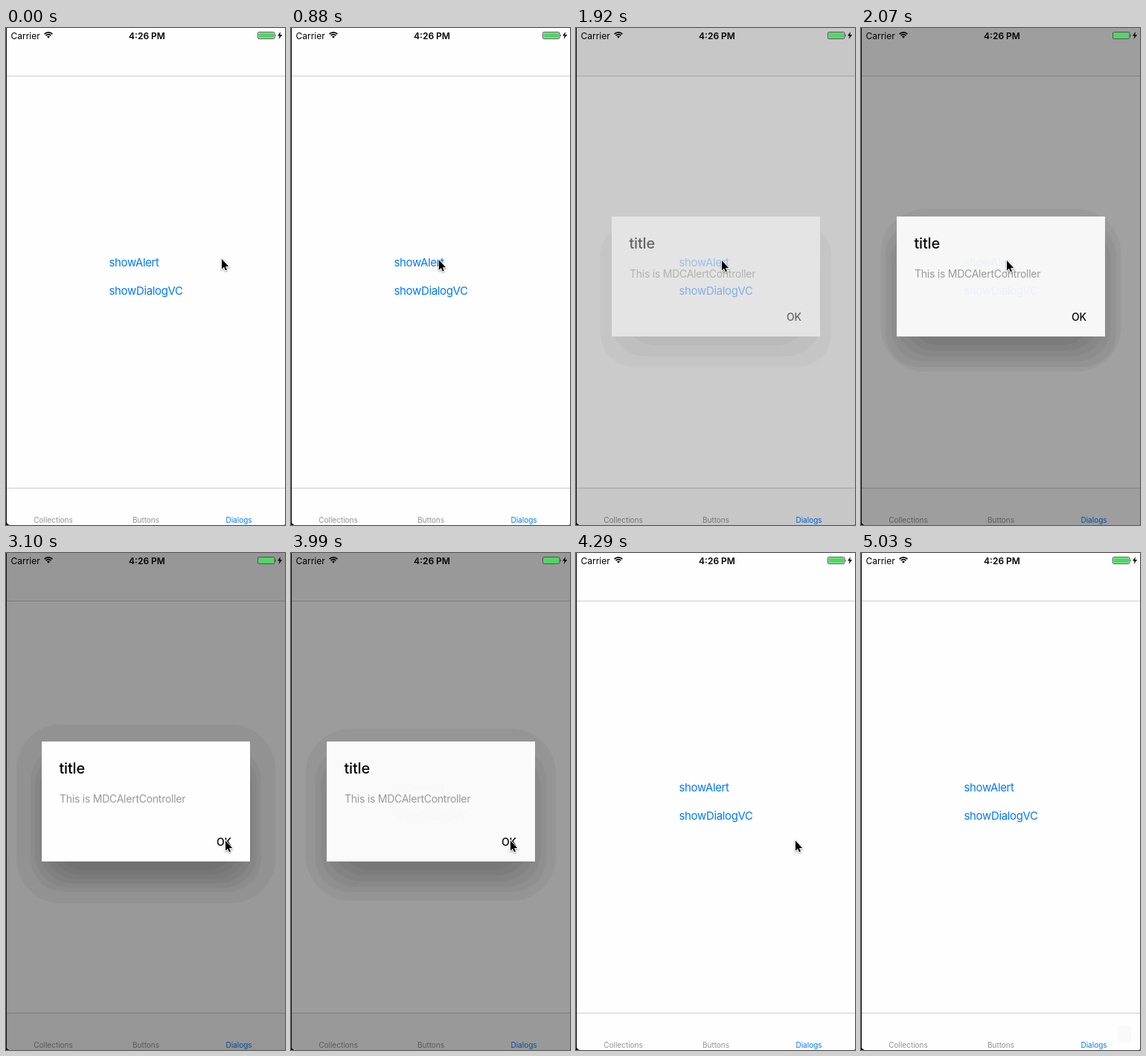
An HTML page that plays this animation: 375x667 px, repeating every 5490 ms.

```html
<!DOCTYPE html>
<html lang="en">
<head>
<meta charset="utf-8">
<title>Alert dialog demo</title>
<style>
  html, body { margin: 0; width: 100%; height: 100%; overflow: hidden; background: #111; }
  svg { display: block; }
  text { font: 15px Inter, "Open Sans", sans-serif; }
  .link { fill: #007aff; letter-spacing: -.023em; }
  .tab { font-size: 10px; text-anchor: middle; fill: #929292; }
  .tab.on { fill: #007aff; }
  .status { font-size: 12px; }
  .time { font-weight: 600; text-anchor: middle; }
  .title { font-size: 20px; font-weight: 500; letter-spacing: -.01em; }
  .message { font-size: 14px; letter-spacing: -.018em; fill: #999; }
  .ok { font-size: 14px; font-weight: 500; letter-spacing: -.02em; }
  #cursor { filter: drop-shadow(0 1px 1px #0006); }
</style>
</head>
<body>
<svg width="375" height="667" viewBox="0 0 375 667">
  <defs>
    <clipPath id="screen"><rect x="1" y="-10" width="376" height="677" rx="5"/></clipPath>
    <clipPath id="outside"><path clip-rule="evenodd" d="M0 0H375V667H0ZM48 253H328V414H48Z"/></clipPath>
  </defs>
  <g clip-path="url(#screen)">
    <rect width="375" height="667" fill="#fefefe"/>
    <path id="bars" d="M0 0H375V64H0ZM0 618H375V667H0Z"/>
    <path d="M0 64.5H375M0 617.5H375" stroke="#cdcdcd"/>
    <rect id="patch" x="346" y="634" width="17" height="23" fill="#f9f9f9"/>
    <text class="link" id="alertLink" x="138.5" y="320">showAlert</text>
    <text class="link" x="138.5" y="358">showDialogVC</text>
    <text class="tab" x="63.5" y="663.5">Collections</text>
    <text class="tab" x="188" y="663.5">Buttons</text>
    <text class="tab on" x="313" y="663.5">Dialogs</text>

    <rect id="dim" width="375" height="667"/>
    <g id="shadow" clip-path="url(#outside)"></g>
    <g id="dialog">
      <rect x="48" y="253" width="280" height="161" fill="#fefefe"/>
      <text class="title" x="71.5" y="296">title</text>
      <text class="message" x="72" y="335">This is MDCAlertController</text>
      <text class="ok" x="283" y="393">OK</text>
    </g>

    <text class="status" x="6.5" y="14.5">Carrier</text>
    <text class="status time" x="189.5" y="14.5">4:26 PM</text>
    <path d="M57 13.7L55 11.6A2.9 2.9 0 0 1 59 11.6Z"/>
    <path d="M53.6 10.1A4.8 4.8 0 0 1 60.4 10.1M51.6 8.1A7.6 7.6 0 0 1 62.4 8.1" fill="none" stroke="#000" stroke-width="1.7"/>
    <rect x="338.5" y="5.5" width="22.5" height="9" rx="1.5" fill="none" stroke="#555"/>
    <rect x="339.5" y="6.5" width="20.5" height="7" rx=".5" fill="#4cd964"/>
    <path d="M361.8 8.2Q363.6 10 361.8 11.8ZM369 5L365 10.6H367.7L366.5 15 371.2 9H368.3Z"/>
    <g id="cursor">
      <path transform="scale(.87)" d="M0 0V15.5L3.4 12.3 5.8 17.6 8 16.6 5.7 11.5H10.6Z" stroke="#fff" stroke-width="2" paint-order="stroke"/>
    </g>
  </g>
</svg>
<script>
// The screen is sampled at a low frame rate; all times below count ticks.
const LOOP = 5490, TICK = 148, LEAD = 12;

// Pointer strokes: start, end, x, y of the tip
const strokes = [
  [2.95, 5, 207, 309], [5, 7, 196, 312],
  [17.97, 20, 298, 401], [20, 21, 295, 386],
  [29, 31, 303, 399], [31, 32, 309, 436], [32, 33, 349, 636]
];

const $ = id => document.getElementById(id);
const progress = (k, from, to) => Math.min(1, Math.max(0, (k - from) / (to - from)));
const easeOut = s => s * (2 - s);
const easeInOut = s => s * s * (3 - 2 * s);

function pointer(k) {
  let x = 290, y = 310;
  for (const [from, to, toX, toY] of strokes) {
    const s = easeOut(progress(k, from, to));
    x += (toX - x) * s;
    y += (toY - y) * s;
  }
  return `translate(${x} ${y})`;
}

function band(x, alpha) {
  const wide = x < 30;
  const top = x + (wide ? 216 : 227);
  const bottom = Math.min(488 - x, 477 - x / 2);
  return `<rect x="${x}" y="${top}" width="${376 - 2 * x}" height="${bottom - top}" rx="${wide ? 60 : 45}" opacity="${alpha}"/>`;
}

// A stepped shadow: more bands as it darkens, then a wide halo
function shadow(opacity) {
  if (!opacity) return "";
  const steps = Math.floor(5 * opacity);
  const edges = Array.from({ length: steps + 1 }, (_, i) => 33 + 29 * i / (steps || 1));
  const halo = 14 + 170 * (1 - opacity);
  if (halo < 33) edges.push(halo);
  return edges.map(x => band(x, .02 + .025 * opacity)).join("");
}

let shown;
function draw(now) {
  requestAnimationFrame(draw);
  const k = Math.floor((now % LOOP + LEAD) / TICK);
  if (k === shown) return;
  shown = k;
  const opacity = easeInOut(progress(k, 11.5, 14.5)) - easeInOut(progress(k, 26.75, 29));
  const pressed = k >= 8 && k < 15;
  const left = k >= 34;
  $("cursor").setAttribute("transform", pointer(k));
  $("cursor").style.opacity = left ? 0 : 1;
  $("patch").style.opacity = left ? 1 : 0;
  $("alertLink").style.opacity = pressed ? .4 + .6 * opacity : 1;
  $("bars").style.fill = opacity ? "#f9f9f9" : "#fefefe";
  $("dim").style.opacity = opacity * .4;
  $("dialog").style.opacity = opacity;
  $("shadow").innerHTML = shadow(opacity);
}
draw(performance.now());
</script>
</body>
</html>
```
